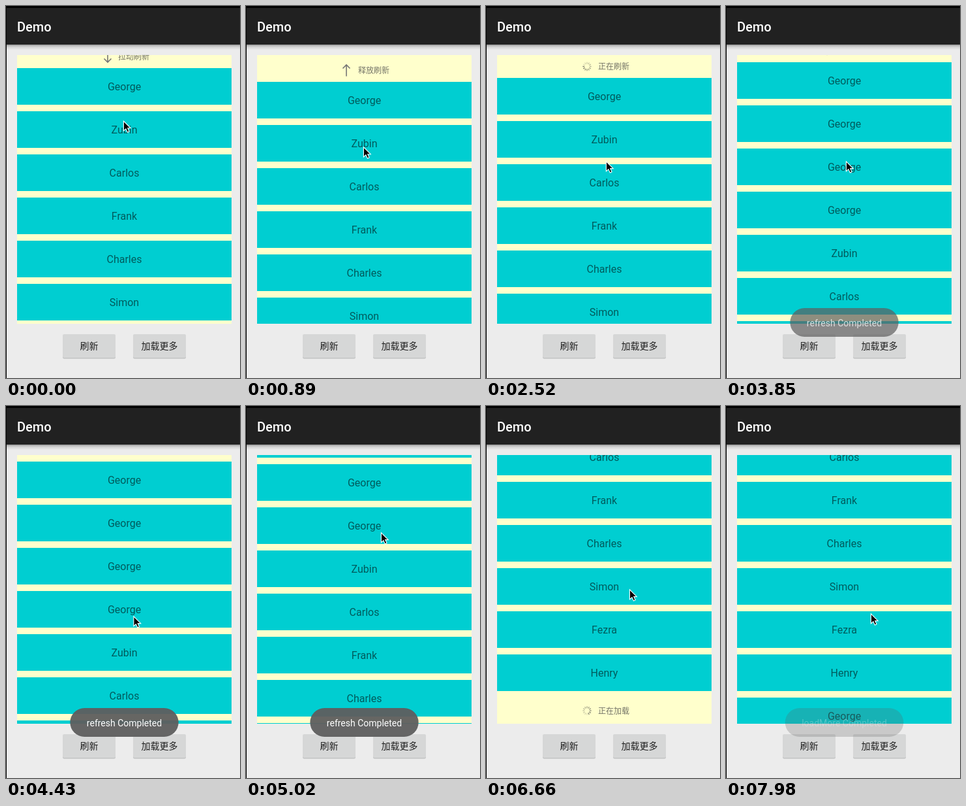
Write an HTML page with a canvas that moves like this. It is 359x569 px and loops after 8000 ms.

```html
<!DOCTYPE html>
<html lang="zh-CN">
<head>
<meta charset="utf-8">
<title>Demo</title>
<style>
html, body { margin: 0; width: 100%; height: 100%; overflow: hidden; background: #ececec; }
canvas { display: block; }
</style>
</head>
<body>
<canvas id="stage" width="359" height="569"></canvas>
<script>
const ctx = document.getElementById('stage').getContext('2d');
const LOOP = 8000, STEP = 147.7;
const ROBOTO = 'Roboto, sans-serif';
const CJK = '"Noto Sans CJK SC", "Noto Sans CJK", sans-serif';
const LIST = { x: 17, y: 75, w: 329, h: 411 };
const MID = 181.5, PITCH = 66, ITEM = 56;
const NAMES = ['George', 'Zubin', 'Carlos', 'Frank', 'Charles', 'Simon', 'Fezra', 'Henry'];

// Moments, counted in screen steps
const RELEASE = 10, REFRESHED = 24, DRAG = 30, FLING = 34, DRAG_AGAIN = 37, LOADING = 42, LOADED = 53;

// Smooth 0 to 1 between two moments
function ramp(k, from, to) {
  const t = Math.min(1, Math.max(0, (k - from) / (to - from)));
  return t * t * (3 - 2 * t);
}

function motion(k) {
  const pulled = 21 * (Math.min(k, 9) / 6) ** 2;
  const drag = ramp(k, DRAG, FLING);
  const fling = ramp(k, FLING, DRAG_AGAIN);
  const dragAgain = ramp(k, DRAG_AGAIN, 41);
  return {
    pull: 10 + pulled - 32.25 * ramp(k, RELEASE, 13) - 25 * ramp(k, REFRESHED, 26.3),
    scroll: 128 * drag + 131 * fling + 106 * dragAgain,
    x: 180.4 + 4 * ramp(k, RELEASE, 15) + 23 * ramp(k, 26, FLING) + 12 * ramp(k, FLING, 39) + 3 * ramp(k, 39, 54),
    y: 176 + 1.9 * pulled - 28 * ramp(k, RELEASE, 15) + 84 * ramp(k, 26, DRAG) - 128 * drag
      + 226 * fling - 108 * dragAgain - 31 * ramp(k, 39, LOADING) + 37 * ramp(k, 49, 54)
  };
}

function rect(x, y, w, h, color) {
  ctx.fillStyle = color;
  ctx.fillRect(x, y, w, h);
}

function pill(x, y, w, h, r, color) {
  ctx.fillStyle = color;
  ctx.beginPath();
  ctx.roundRect(x, y, w, h, r);
  ctx.fill();
}

function text(str, x, y, font, color, align = 'center') {
  ctx.font = font;
  ctx.fillStyle = color;
  ctx.textAlign = align;
  ctx.fillText(str, x, y);
}

function arrow(y, up) {
  ctx.save();
  ctx.translate(155, y);
  if (up) ctx.rotate(Math.PI);
  ctx.strokeStyle = '#757575';
  ctx.lineWidth = 1.6;
  ctx.beginPath();
  ctx.moveTo(1, -9);
  ctx.lineTo(1, 8.5);
  ctx.moveTo(-4.5, 3);
  ctx.lineTo(1, 8.5);
  ctx.lineTo(6.5, 3);
  ctx.stroke();
  ctx.restore();
}

function spinner(y, k) {
  ctx.save();
  ctx.translate(155, y);
  ctx.lineWidth = 1.4;
  for (let i = 0; i < 12; i++) {
    ctx.strokeStyle = `rgba(100,100,90,${0.2 + 0.6 * ((i + k * 10) % 12) / 11})`;
    ctx.beginPath();
    ctx.moveTo(0, -3.8);
    ctx.lineTo(0, -6.7);
    ctx.stroke();
    ctx.rotate(Math.PI / 6);
  }
  ctx.restore();
}

function hint(y, k, busy, ready, action) {
  if (busy) spinner(y, k); else arrow(y, ready);
  const label = (busy ? '正在' : ready ? '释放' : '拉动') + action;
  text(label, 172, y + 4.7, '500 12px ' + CJK, '#757568', 'left');
}

function list(k, pull, scroll) {
  const top = Math.round(85 + pull - scroll);
  const names = [...Array(k > REFRESHED ? 3 : 0).fill('George'), ...NAMES];
  const end = top + names.length * PITCH;
  if (k >= LOADED) names.push('George');

  ctx.save();
  ctx.beginPath();
  ctx.rect(LIST.x, LIST.y, LIST.w, LIST.h);
  ctx.clip();
  rect(LIST.x, LIST.y, LIST.w, LIST.h, '#ffffcc');
  hint(top - 17.5, k, k > RELEASE, pull >= 25, '刷新');
  names.forEach((name, i) => {
    const y = top + i * PITCH;
    rect(LIST.x, y, LIST.w, ITEM, '#00ced1');
    text(name, MID, y + 34, '16px ' + ROBOTO, 'rgba(0,0,0,.56)');
  });
  if (k < LOADED) hint(end + 20, k, k >= LOADING, scroll >= 350, '加载');
  ctx.restore();
}

function button(x, label) {
  pill(x, 503, 81, 36.5, 2, '#c2c3c3');
  pill(x, 502, 81, 36, 2, '#d6d7d7');
  text(label, x + 40.5, 525.3, '500 14px ' + CJK, '#1f1f1f');
}

function toast(label, k, start) {
  ctx.save();
  ctx.globalAlpha = ramp(k, start, start + 3) * (1 - ramp(k, start + 14, start + 17));
  ctx.font = '14px ' + ROBOTO;
  const w = ctx.measureText(label).width + 51;
  pill(MID - w / 2, 462, w, 44, 22, 'rgba(94,94,94,.95)');
  text(label, MID, 489.5, ctx.font, '#fff');
  ctx.restore();
}

function pointer(x, y) {
  ctx.beginPath();
  [[0, 0], [0, 15], [3.5, 11.8], [6, 17.2], [8.6, 16], [6.3, 10.8], [10.8, 10.8]]
    .forEach(([dx, dy]) => ctx.lineTo(x + dx, y + dy));
  ctx.closePath();
  ctx.fillStyle = '#000';
  ctx.fill();
  ctx.strokeStyle = '#fff';
  ctx.lineWidth = 1.1;
  ctx.stroke();
}

function appBar() {
  const shade = ctx.createLinearGradient(0, 59, 0, 67);
  shade.addColorStop(0, 'rgba(0,0,0,.36)');
  shade.addColorStop(0.4, 'rgba(0,0,0,.12)');
  shade.addColorStop(1, 'rgba(0,0,0,0)');
  rect(0, 59, 359, 8, shade);
  rect(0, 3, 359, 56, '#212121');
  rect(0, 0, 359, 3, '#000');
  rect(0, 0, 1, 569, '#000');
  text('Demo', 17, 39, '500 20px ' + ROBOTO, '#fff', 'left');
}

function draw() {
  // The screen is refreshed in discrete steps.
  const k = Math.floor((performance.now() % LOOP + 5) / STEP);
  const { pull, scroll, x, y } = motion(k);
  rect(0, 0, 359, 569, '#ececec');
  appBar();
  list(k, pull, scroll);
  button(87, '刷新');
  button(195, '加载更多');
  toast('refresh Completed', k, REFRESHED);
  toast('loadMore Completed', k, LOADED);
  pointer(x, y);
  requestAnimationFrame(draw);
}
draw();
</script>
</body>
</html>
```
